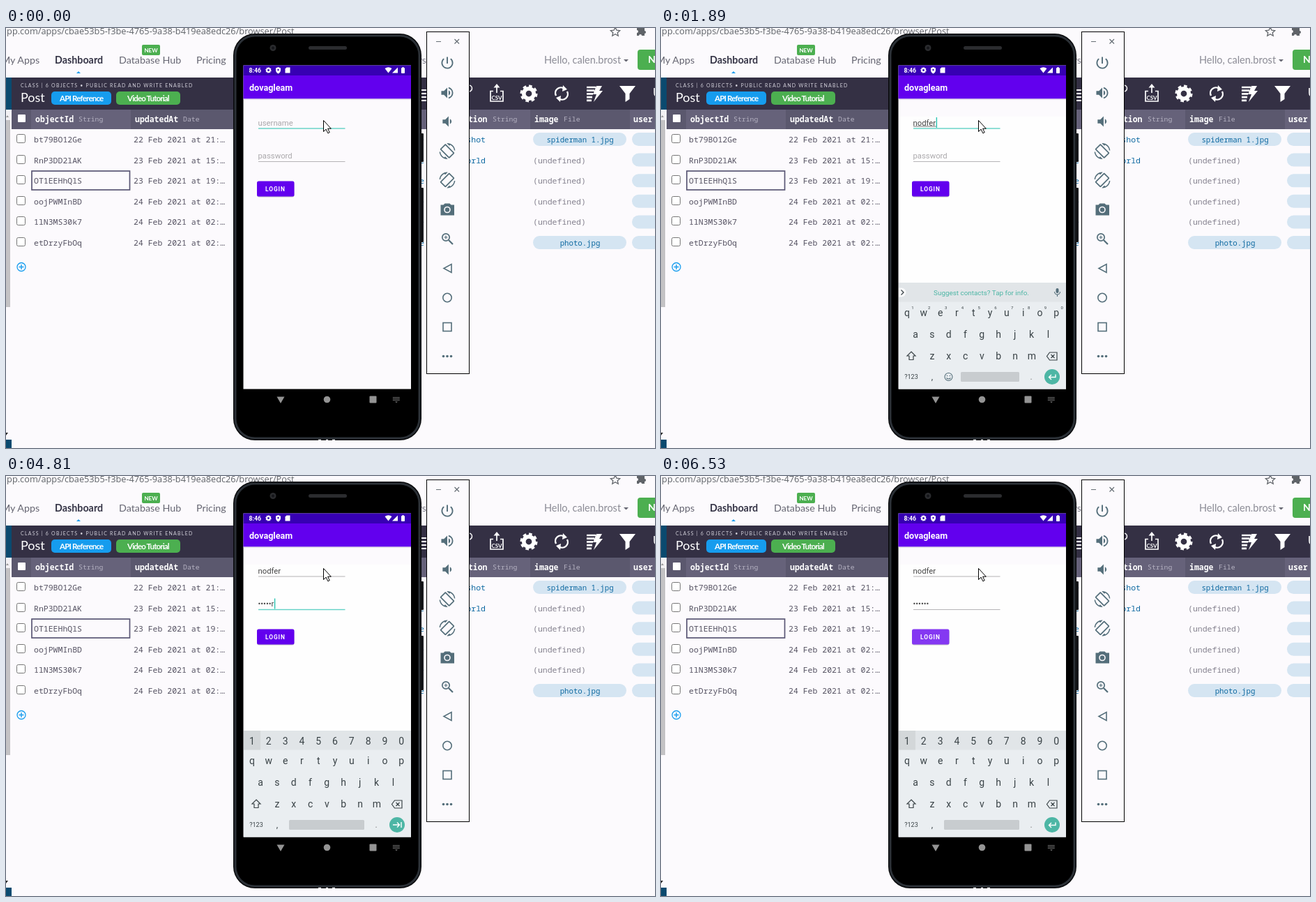
An HTML page that plays this animation: 931 px wide and 602 px high, repeating every 7990 ms.

```html
<!DOCTYPE html>
<html lang="en">
<head>
<meta charset="utf-8">
<title>Login demo</title>
<style>
  html, body { margin: 0; width: 100%; height: 100%; overflow: hidden; background: #fcfafd; }
  svg { display: block; width: 931px; height: 602px; }
  text { white-space: pre; }
  .lato { font-family: Lato, sans-serif; }
  .mono { font-family: "Noto Sans Mono", monospace; }
  .open { font-family: "Open Sans", sans-serif; }
  .robo { font-family: Roboto, sans-serif; }
</style>
</head>
<body>
<svg id="stage" viewBox="0 0 931 602"></svg>
<script>
const LOOP = 7990;
const TEAL = '#4db6a5', KEY = '#3a4347', SLATE = '#546e7a', LINK = '#0e69a1';

// ---- drawing helpers ----
const rect = (x, y, w, h, fill, more = '') =>
  `<rect x="${x}" y="${y}" width="${w}" height="${h}" fill="${fill}" ${more}/>`;
const circle = (x, y, r, fill, more = '') => `<circle cx="${x}" cy="${y}" r="${r}" fill="${fill}" ${more}/>`;
const shape = (d, fill, more = '') => `<path d="${d}" fill="${fill}" ${more}/>`;
const line = (d, stroke, width = 1, more = '') =>
  `<path d="${d}" fill="none" stroke="${stroke}" stroke-width="${width}" ${more}/>`;
const text = (font, x, y, str, size, fill, more = '') =>
  `<text class="${font}" x="${x}" y="${y}" font-size="${size}" fill="${fill}" ${more}>${str}</text>`;
const group = (id, body, more = '') => `<g id="${id}" ${more}>${body}</g>`;
const BOLD = 'font-weight="700"', MID = 'text-anchor="middle"', END = 'text-anchor="end"';

const gear = (x, y, r, fill) =>
  circle(x, y, r * .58, 'none', `stroke="${fill}" stroke-width="${r * .46}"`) +
  circle(x, y, r * .86, 'none', `stroke="${fill}" stroke-width="${r * .28}" pathLength="16" stroke-dasharray="1.1 .9"`);

// ---- dashboard behind the phone ----
function topBar() {
  const grey = '#5f6368', nav = '#666672';
  return text('open', -6, 8.5, 'app.com/apps/cbae53b5-f3be-4765-9a38-b419ea8edc26/browser/Post', 12.75, grey) +
    line('M874 -1l2 4.200 4.600.500-3.400 3 1 4.500-4.200-2.400-4.200 2.400 1-4.500-3.400-3 4.600-.500z', grey, 1.3) +
    shape('M905 0h4a2 2 0 0 1 4 0h3v4a2 2 0 0 1 0 4v3h-4a2 2 0 0 0-4 0h-3v-4a2 2 0 0 0 0-4z', grey) +
    text('lato', -7, 51, 'My Apps', 14.3, nav) +
    text('lato', 70, 51, 'Dashboard', 14.3, '#353446', BOLD) +
    shape('M104 62l3 3h-6z', '#169cee') +
    rect(195, 24, 26, 15, '#4caf50', 'rx="2"') +
    text('lato', 208, 34.5, 'NEW', 8, '#fff', `${BOLD} ${MID}`) +
    text('lato', 162, 51, 'Database Hub', 14.3, nav) +
    text('lato', 273, 51, 'Pricing', 14.3, nav) +
    text('lato', 603, 51, 'Partners', 14.3, '#777783', END) +
    text('lato', 772, 50.5, 'Hello, calen.brost', 14.5, '#8b8b95') +
    shape('M886 45h7l-3.500 3.500z', nav) +
    rect(906, 31, 40, 29, '#4caf50', 'rx="4"') +
    text('lato', 921, 50, 'N', 14, '#fff', BOLD);
}

function classBar() {
  const W = '#fff';
  return rect(0, 71, 931, 46, '#343044') + rect(0, 71, 8, 46, '#0a4a6f') +
    text('lato', 21, 84.5, 'CLASS | 6 OBJECTS • PUBLIC READ AND WRITE ENABLED', 7, '#d2d0da', 'letter-spacing="1.23"') +
    text('lato', 21, 106, 'Post', 18, W) +
    rect(65, 91, 86, 19, '#169cee', 'rx="5"') +
    text('lato', 77, 105, 'API Reference', 11.5, W, `${BOLD} letter-spacing="-.8"`) +
    rect(158, 91, 92, 19, '#4caf50', 'rx="5"') +
    text('lato', 174, 105, 'Video Tutorial', 11.5, W, `${BOLD} letter-spacing="-.85"`) +
    line('M596 89h7m-7 5h7m-7 5h7m-7 5h7', W, 2) +
    line('M664 82a4.500 4.500 0 0 1 0 9', W, 1.5) +
    line('M699 90.500h-4v14.500h18v-14.500h-4M704 93v-9', W, 1.7) + shape('M704 80l4.500 5.500h-9z', W) +
    text('lato', 704, 102.5, 'CSV', 8, W, `${BOLD} ${MID}`) +
    gear(750, 94, 12.5, W) +
    line('M789 97a8 8 0 0 1 12-10M805 91a8 8 0 0 1-12 10', W, 2.4) +
    shape('M799 82l6 6-7 3zM795 106l-6-6 7-3z', W) +
    line('M833 85h13m-13 4.700h11m-11 4.700h9m-9 4.700h8m-8 4.700h7', W, 2.7) +
    shape('M847 83h8l-4 7h5l-13 16 4-11h-5z', W) +
    shape('M880 83h23l-8.500 11v8l-6 4v-12z', W) +
    line('M930 86v7q0 4 3 5', W, 1.6);
}

function table() {
  const ink = '#555262';
  const heading = (x, name, type, tx) =>
    text('mono', x, 134.5, name, 11.5, '#fff', BOLD) + text('mono', tx, 134, type, 9.8, '#b5b2c2');
  const ids = ['bt79BO12Ge', 'RnP3DD2lAK', 'OT1EEHhQlS', 'oojPWMInBD', '1lN3MS30k7', 'etDrzyFbOq'];
  const dates = ['22 Feb 2021 at 21:…', '23 Feb 2021 at 15:…', '23 Feb 2021 at 19:…'];
  const files = { 0: 'spiderman 1.jpg', 5: 'photo.jpg' };
  const notes = ['screenshot', 'hello world'];
  let out = rect(8, 117, 923, 28, '#66627a') +
    [[8, 28], [179, 160], [752, 143]].map(([x, w]) => rect(x, 117, w, 28, '#5b586e')).join('') +
    rect(17, 124, 11, 11, '#fff', 'rx="1"') +
    heading(42, 'objectId', 'String', 104) + heading(185, 'updatedAt', 'Date', 254) +
    text('mono', 690.5, 134.5, 'caption', 11.5, '#fff', `${BOLD} ${END}`) +
    text('mono', 698, 134, 'String', 9.8, '#b5b2c2') +
    heading(758, 'image', 'File', 800) + heading(900, 'user', '', 931) +
    rect(0, 117, 6, 283, '#f3f1f4') + rect(0, 132, 6, 268, '#c3c2c4') + shape('M0 128l2-3 2 3z', '#999') +
    shape('M0 580h3l-3 4z', '#222') + rect(0, 590, 8, 12, '#0a4a6f');
  ids.forEach((id, i) => {
    const y = 160 + i * 29.6, base = y + 4;
    out += rect(15.5, Math.round(y - 8) + .5, 12, 12, '#fff', 'rx="2" stroke="#767676"') +
      text('mono', 40, base, id, 11.5, ink) +
      text('mono', 183, base, dates[i] || '24 Feb 2021 at 02:…', 11.5, ink) +
      text('mono', 600, base, 'e', 11.5, LINK, END) +
      (notes[i] ? text('mono', 688, base, notes[i], 11.5, LINK, END) : '') +
      rect(898, y - 10, 60, 19, '#d5e5f2', 'rx="9.5"') +
      (files[i]
        ? rect(756, y - 10, 134, 19, '#d5e5f2', 'rx="9.5"') + text('mono', 823.5, base, files[i], 10.7, LINK, MID)
        : text('mono', 756, base, '(undefined)', 11.5, '#85828f'));
  });
  return out + rect(37, 205, 140.5, 27, 'none', 'stroke="#5a5674" stroke-width="1.7"') +
    circle(22, 342.5, 6, 'none', 'stroke="#169cee" stroke-width="1.3"') +
    line('M18.500 342.500h7M22 339v7', '#169cee', 1.4);
}

// ---- emulator ----
function phone() {
  const W = '#fff', nav = '#949494';
  return rect(594, 151, 5, 41, '#16181b', 'rx="1"') + rect(594, 229, 5, 78, '#16181b', 'rx="1"') +
    rect(326, 8, 270, 583, '#08090b', 'rx="31"') +
    rect(329, 11, 264, 577, '#000', 'rx="28" stroke="#2b3036" stroke-width="3"') +
    circle(383, 28.5, 4.5, '#2a2b2e') + circle(383, 28.5, 2, '#15161a') +
    rect(434, 26, 55, 5, '#2b2c2f', 'rx="2.5"') +
    rect(340.5, 53.5, 240.5, 464, '#fcfafd') + rect(340.5, 53.5, 240.5, 14.5, '#3700b3') +
    rect(340.5, 68, 240.5, 33.5, '#6200ee') + rect(340.5, 101.5, 240.5, 1, '#cfc6dc') +
    text('robo', 348.5, 63.5, '8:46', 8.8, W, BOLD) +
    gear(376.5, 60.5, 4.2, W) +
    shape('M390.500 56l3.500 1.500v3q0 3-3.500 5-3.500-2-3.500-5v-3z', W) + circle(390.5, 60, 1.2, '#3700b3') +
    shape('M402.500 56.500h5v8h-7v-6z', W) +
    shape('M543.500 58q5-3.500 10 0l-5 6.500z', W) + shape('M562 56.500v8h-8z', W) +
    rect(567, 57, 5, 8, W, 'rx="1"') + rect(568.5, 56, 2, 1.5, W) +
    text('robo', 349, 89.5, 'dovagleam', 12.6, W, BOLD) +
    shape('M388.500 528.500h11l-5.500 9.500z', nav) + circle(460.5, 532.5, 4.8, nav) +
    rect(521.5, 527.5, 10, 10, nav, 'rx="1"') +
    line('M555 529.500h10m-10 2h10m-10 2h10', nav, 1.2, 'stroke-dasharray="1.4 .6"') + shape('M558 535.500h4l-2 1.500z', nav) +
    line('M448 590.500h4m7 0h3m6 0h4', '#ddd', 1.5);
}

function form() {
  return rect(341, 127, 240, 390, '#fefefe', 'id="panel"') +
    rect(362, 143.5, 124.5, 1, '#b5b3b6', 'id="userLine"') + rect(362, 191, 124.5, 1, '#b5b3b6', 'id="passLine"') +
    text('robo', 361.5, 139.5, '', 11.3, '#444', 'id="user"') +
    rect(362, 140.5, 0, 1, '#777', 'id="compose"') +
    text('robo', 361.5, 186.5, '', 11.3, '#444', 'id="pass"') +
    rect(362, 128, 1.4, 15, '#2bc4b2', 'id="caret"') +
    rect(360, 221, 53.5, 21.5, '#000', 'rx="3" opacity=".22"') +
    rect(360, 219.5, 53.5, 22, '#6200ee', 'rx="2.5" id="button"') +
    text('robo', 372, 234, 'LOGIN', 8.4, '#fff', `${BOLD} letter-spacing=".95"`) +
    `<clipPath id="edge">${rect(360, 219.5, 53.5, 22, '#000', 'rx="2.5"')}</clipPath>` +
    circle(387, 230.5, 0, '#fff', 'id="ripple" clip-path="url(#edge)"');
}

function keyboard() {
  const PITCH = 23.8;
  const row = (chars, x, y, size = 14) => [...chars].map((c, i) =>
    text('robo', x + i * PITCH, y, c, size, KEY, MID)).join('');
  const enter = line('M566 496.500v4h-9.500m3.500-3.500l-3.500 3.500 3.500 3.500', '#fff', 1.4);
  const next = line('M555 500h9.500m-3.500-3.500l3.500 3.500-3.500 3.500M567 496v8', '#fff', 1.4);
  return rect(341, 365, 240, 152.5, '#eaeef1') + rect(341, 365, 240, 27.5, '#e1e5e8') +
    group('strip',
      shape('M341 372.500h4a6.500 6.500 0 0 1 0 13h-4z', '#f9fafb') + line('M344.500 375.500l3.500 3.500-3.500 3.500', KEY, 1.3) +
      text('robo', 459.5, 382.5, 'Suggest contacts? Tap for info.', 9.9, TEAL, `${MID} id="suggest"`) +
      rect(566.5, 373, 4, 7, SLATE, 'rx="2"') + line('M564.500 378a4 4 0 0 0 8 0M568.500 382v3', SLATE, 1.1)) +
    group('digits', rect(341, 365, 24, 27.5, '#d3d7d9') + row('1234567890', 353, 384.5)) +
    group('hints', row('1234567890', 361, 403, 6)) +
    row('qwertyuiop', 353, 412.5) + row('asdfghjkl', 365, 443.5) + row('zxcvbnm', 389, 474.5) +
    line('M359 464l6 6h-3v5.500h-6v-5.500h-3z', KEY, 1.2) +
    line('M557.500 465h10.500v11h-10.500l-4-5.500zM559.500 468l5 5m0-5l-5 5', KEY, 1.2) +
    text('robo', 359, 503, '?123', 9, KEY, MID) + row(',', 389, 504, 12) + text('robo', 531, 504, '.', 12, '#777', MID) +
    group('smile', circle(412.5, 500, 5.5, 'none', `stroke="${SLATE}" stroke-width="1.1"`) +
      circle(410.5, 498.5, .8, SLATE) + circle(414.5, 498.5, .8, SLATE) +
      line('M409.500 501.500q3 3 6 0', SLATE, 1.1)) +
    rect(430, 493, 84, 14, '#c8cccf', 'rx="1.5" id="space"') +
    circle(561, 500, 11, TEAL) + group('enter', enter) + group('next', next);
}

function toolbar() {
  const fill = SLATE, paper = '#fcfafd';
  // 24-unit icons, centred on the toolbar; a negative flip mirrors them
  const icon = (y, d, flip = 1) =>
    `<g transform="translate(633 ${y}) scale(${.95 * flip} .95) translate(-12 -12)">${shape(d, fill)}</g>`;
  const rotate = 'M16.480 2.520c3.270 1.550 5.610 4.720 5.970 8.480h1.500C23.440 4.840 18.290 0 12 0l-.660.030 3.810 3.810zM10.230 1.750c-.590-.590-1.540-.590-2.120 0L1.750 8.110c-.590.590-.590 1.540 0 2.120l12.020 12.020c.590.590 1.540.590 2.120 0l6.360-6.360c.590-.590.590-1.540 0-2.120zm4.600 19.040L3.210 9.170l5.960-5.960 11.620 11.620zM7.520 21.480C4.250 19.940 1.910 16.760 1.550 13H.050C.560 19.160 5.710 24 12 24l.660-.030-3.810-3.810z';
  return rect(603.5, 5.5, 61, 490, paper, 'stroke="#000"') +
    line('M617 19.500h7M643.500 16l6.500 6.500m0-6.500l-6.500 6.500', '#666e75', 1.2) +
    icon(50, 'M13 3h-2v10h2V3zm4.830 2.170l-1.420 1.420A6.920 6.920 0 0 1 19 12a7 7 0 1 1-11.410-5.410L6.170 5.170A9 9 0 1 0 21 12c0-2.740-1.230-5.180-3.170-6.830z') +
    icon(93, 'M3 9v6h4l5 5V4L7 9H3zm13.500 3A4.500 4.500 0 0 0 14 7.970v8.050A4.500 4.500 0 0 0 16.500 12zM14 3.230v2.060a7 7 0 0 1 0 13.420v2.060a9 9 0 0 0 0-17.540z') +
    icon(134, 'M18.500 12A4.500 4.500 0 0 0 16 7.970v8.050A4.500 4.500 0 0 0 18.500 12zM5 9v6h4l5 5V4L9 9H5z') +
    icon(176.5, rotate) + icon(218, rotate, -1) +
    shape('M629.500 251.500h7l2 2h4.500v15h-19.500v-15h4z', fill) +
    circle(633, 260.5, 4, fill, `stroke="${paper}" stroke-width="1.6"`) +
    circle(631, 300, 5.2, 'none', `stroke="${fill}" stroke-width="1.7"`) +
    line('M635 304l6 6', fill, 2.2) + line('M628.500 300h5M631 297.500v5', fill, 1.2) +
    line('M639 338.500v12l-11-6z', fill, 1.6) +
    circle(633, 386.5, 6.2, 'none', `stroke="${fill}" stroke-width="1.6"`) +
    rect(627, 422.5, 12, 12, 'none', `stroke="${fill}" stroke-width="1.6"`) +
    [627.5, 633, 638.5].map(x => circle(x, 470.5, 1.8, fill)).join('');
}

const pointer = shape('M455.500 132.500v16l3.600-3.400 2.700 5.700 2.400-1.100-2.600-5.500h4.700z', '#fff', 'stroke="#000"');

const stage = document.getElementById('stage');
stage.innerHTML = topBar() + classBar() + table() + phone() + form() +
  group('keyboard', keyboard()) + toolbar() + pointer;
const el = {};
stage.querySelectorAll('[id]').forEach(node => el[node.id] = node);

// ---- timeline: each step overrides part of the state ----
const steps = [
  [0, { user: '', pass: '', focus: 'user', caret: 0, keys: 0, suggest: 1, secret: 0, next: 0, composing: 0, button: '#6200ee', ripple: [0, 0] }],
  [150, { caret: 1 }],
  [650, { caret: 0, keys: .85 }],
  [770, { keys: 1 }],
  [920, { user: 'nod', caret: 1, composing: 1 }],
  [1500, { caret: 0 }],
  [1650, { user: 'nodf', caret: 1 }],
  [1770, { user: 'nodfe' }],
  [1890, { user: 'nodfer' }],
  [2390, { caret: 0 }],
  [2670, { focus: 'pass', caret: 1, composing: 0, suggest: .4 }],
  [2790, { suggest: 0 }],
  [3190, { caret: 0 }],
  [3340, { pass: '•o', caret: 1, secret: 1, next: 1 }],
  [3460, { pass: '••d' }],
  [3610, { pass: '•••f' }],
  [3760, { pass: '••••e' }],
  [3910, { pass: '•••••r' }],
  [4440, { caret: 0 }],
  [4810, { caret: 1 }],
  [5340, { focus: '', caret: 0, pass: '••••••', button: '#731cf0' }],
  [5460, { next: 0, button: '#8438f2' }],
  [6140, { ripple: [21, .4] }],
  [6260, { ripple: [26, .38] }],
  [6410, { ripple: [32, .18] }],
  [6530, { ripple: [0, 0] }],
];

const set = (id, attrs) => Object.entries(attrs).forEach(([k, v]) => el[id].setAttribute(k, v));
const show = (id, on) => set(id, { display: on ? 'inline' : 'none' });

function field(id, value, hint) {
  el[id].textContent = value || hint;
  set(id, { fill: value ? '#444' : '#aaa8ab' });
}

function underline(id, y, on) {
  set(id, on ? { y: y - .2, height: 1.4, fill: '#62d2c5' } : { y, height: 1, fill: '#b5b3b6' });
}

function render(s) {
  field('user', s.user, 'username');
  field('pass', s.pass, 'password');
  underline('userLine', 143.5, s.focus === 'user');
  underline('passLine', 191, s.focus === 'pass');
  const width = id => s[id] ? el[id].getComputedTextLength() : 0;
  set('compose', { width: s.composing ? width('user') : 0 });
  show('caret', s.caret);
  if (s.caret) set('caret', { x: 362 + width(s.focus), y: s.focus === 'user' ? 128 : 175.5 });
  show('panel', s.keys);
  set('keyboard', { opacity: s.keys, transform: `translate(0 ${s.keys < 1 ? 6 : 0})` });
  set('suggest', { opacity: s.suggest });
  show('strip', !s.secret);
  show('hints', !s.secret);
  show('smile', !s.secret);
  show('digits', s.secret);
  set('space', s.secret ? { x: 406, width: 108 } : { x: 430, width: 84 });
  show('next', s.next);
  show('enter', !s.next);
  set('button', { fill: s.button });
  set('ripple', { r: s.ripple[0], opacity: s.ripple[1] });
}

let shown = -1;
function tick() {
  const time = performance.now() % LOOP;
  const index = steps.findLastIndex(([start]) => start <= time);
  if (index !== shown) {
    shown = index;
    render(Object.assign({}, ...steps.slice(0, index + 1).map(([, change]) => change)));
  }
  requestAnimationFrame(tick);
}
tick();
</script>
</body>
</html>
```
